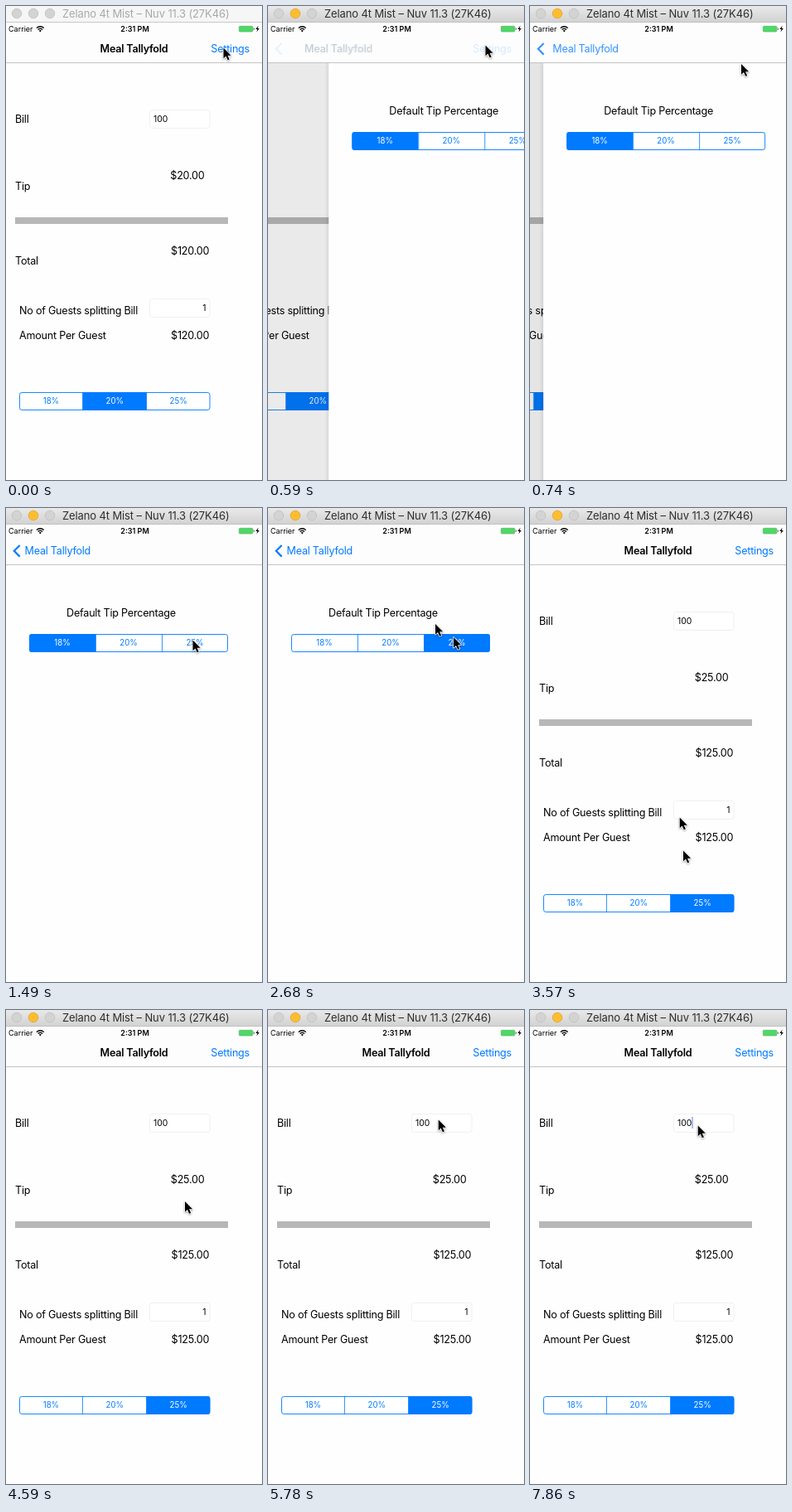
Animation, 309 px wide and 572 px high, one loop 8000 ms. Source, as an HTML page:

```html
<!DOCTYPE html>
<html lang="en">
<head>
<meta charset="utf-8">
<title>Bill splitter demo</title>
<style>
  html, body { margin: 0; width: 100%; height: 100%; overflow: hidden; background: #fefefe; }
  svg { display: block; width: 309px; height: 572px; }
  text { font: 400 12.6px Inter, "Liberation Sans", sans-serif; letter-spacing: -.23px; fill: #000; white-space: pre; }
  .blue { fill: #007aff; }
  .bold { font-weight: 600; }
  .end { text-anchor: end; }
  .mid { text-anchor: middle; }
  .status { font-size: 9px; letter-spacing: 0; }
  .field { font-size: 10.4px; letter-spacing: 0; }
  .seg { font-size: 9.7px; letter-spacing: 0; text-anchor: middle; }
  .window { font-size: 13px; letter-spacing: -.12px; }
  .cursor { filter: drop-shadow(0 1px 1px rgba(0, 0, 0, .35)); }
</style>
</head>
<body>
<svg id="stage" viewBox="0 0 309 572"></svg>
<script>
const LOOP = 8000, STEP = 148.2, BLUE = '#007aff';
const APP = 'Meal Tallyfold';
const WINDOW = 'Zelano 4t Mist – Nuv 11.3 (27K46)';
const RATES = [18, 20, 25];
const BILL = 100;

// Pointer tip as [tick, x, y]; each place holds until the next.
const POINTER = [
  [0, 262.5, 50.5], [3, 262.5, 49], [4, 262.5, 47.5], [5, 255, 70], [6, 240, 115], [7, 228, 143],
  [8, 224.5, 153], [9, 225, 156], [10, 225.5, 159.5], [17, 224, 156], [18, 202, 140],
  [19, 80, 75], [20, 20, 51], [22, 80, 190], [23, 181, 373], [24, 185, 413.5],
  [25, 198, 448], [26, 208, 468], [27, 214, 477], [28, 215, 478],
  [30, 133, 345], [31, 216, 231], [33, 216, 212], [34, 216, 185], [35, 216, 167],
  [38, 210, 146], [39, 205.7, 132.5], [42, 203, 137], [43, 202.7, 139.5]
];
// The pointer leaves a brief trail on these ticks.
const TRAIL = { 18: [224, 156], 24: [180.7, 373.5] };
const CARET = [[0, 0], [48, .8], [50, .35], [51, 0], [53, .6]];

const label = (x, y, s, cls = '', id = '') =>
  `<text x="${x}" y="${y}" class="${cls}"${id && ` id="${id}"`}>${s}</text>`;

const field = y =>
  `<rect x="173.5" y="${y}" width="72.5" height="22" rx="3" fill="#fff" stroke="#f0f0f0"/>`;

function segments(id, x, y, w) {
  const part = w / 3;
  const cells = RATES.map((r, i) =>
    `<rect id="${id}Fill${i}" x="${x + i * part}" y="${y}" width="${part}" height="22"/>` +
    label(x + (i + .5) * part, y + 14.2, r + '%', 'seg', `${id}Text${i}`)).join('');
  const lines = [1, 2].map(i => `M${Math.floor(x + i * part) + .5} ${y}v22`).join('');
  return `<clipPath id="${id}Clip"><rect x="${x}" y="${y}" width="${w}" height="22" rx="3"/></clipPath>
    <g clip-path="url(#${id}Clip)">${cells}</g>
    <rect x="${x + .5}" y="${y + .5}" width="${w - 1}" height="21" rx="2.7" fill="none" stroke="${BLUE}" stroke-width=".9"/>
    <path d="${lines}" stroke="${BLUE}" stroke-width=".8"/>`;
}

const arrow = id => `<g id="${id}"><path class="cursor" d="M0 0V12.8L3 10L5.1 14.8L7.2 13.9L5.1 9.3H9.2Z"
  fill="#000" stroke="#fff" stroke-width="1.5" stroke-linejoin="round" paint-order="stroke"/></g>`;

const stage = document.getElementById('stage');
stage.innerHTML = `
<defs>
  <linearGradient id="chrome" x2="0" y2="1"><stop stop-color="#e9e9e9"/><stop offset="1" stop-color="#d1d1d1"/></linearGradient>
  <linearGradient id="edge"><stop stop-color="#000" stop-opacity="0"/><stop offset="1" stop-color="#000" stop-opacity=".08"/></linearGradient>
  <clipPath id="body"><rect y="69" width="309" height="503"/></clipPath>
</defs>
<rect width="309" height="572" fill="#fefefe"/>
<g clip-path="url(#body)">
  <g id="main">
    ${label(11, 141, 'Bill')}${field(125.5)}${label(178, 140, BILL, 'field')}
    <rect id="caret" x="195.3" y="129" width="1.5" height="14" fill="#426bf2"/>
    ${label(11, 222, 'Tip')}${label(239.5, 209, '', 'end', 'tip')}
    <rect x="11" y="255" width="257" height="8" fill="#b7b7b7"/>
    ${label(11, 312, 'Total')}${label(245.2, 299.5, '', 'end', 'total')}
    ${label(16, 371.5, 'No of Guests splitting Bill')}${field(353.5)}${label(241.5, 368, 1, 'field end')}
    ${label(16, 402.3, 'Amount Per Guest')}${label(245.2, 402.3, '', 'end', 'share')}
    ${segments('rate', 16, 466, 230.5)}
  </g>
  <rect id="dim" y="69" width="309" height="503"/>
  <g id="prefs">
    <rect x="-5" y="69" width="5" height="503" fill="url(#edge)"/>
    <rect y="69" width="309" height="503" fill="#fefefe"/>
    ${label(139, 131, 'Default Tip Percentage', 'mid')}
    ${segments('pref', 28, 152, 240)}
  </g>
</g>
<rect y="20" width="309" height="48.5" fill="#fdfdfd"/>
<path d="M0 68.5H309" stroke="#c4c4c4"/>
${label(3, 31, 'Carrier', 'status')}
<g fill="none" stroke="#000" stroke-width="1.3">
  <path d="M36.8 26.6a6.4 6.4 0 0 1 9 0M38.6 28.5a3.8 3.8 0 0 1 5.4 0"/>
  <path d="M41.3 31.4l-1.5-1.6a2.1 2.1 0 0 1 3 0z" fill="#000" stroke="none"/>
</g>
${label(155.5, 31, '2:31 PM', 'status bold mid')}
<rect x="281.3" y="24.3" width="16.6" height="6.8" rx="1.3" fill="#4cd964" stroke="#5fa66c" stroke-width=".6"/>
<path d="M298.8 26.3q1 .3 1 1.4t-1 1.4z" fill="#444"/>
<path d="M304.6 23.8l-3.3 4.3h2.1l-1 3.4l3.4-4.4h-2.1z"/>
<path id="chevron" d="M16.6 45l-6.8 6.8l6.8 6.8" fill="none" stroke="${BLUE}" stroke-width="2.2"/>
${label(0, 56, APP, 'bold', 'title')}
${label(0, 56, APP, 'blue', 'back')}
${label(294, 56, 'Settings', 'blue end', 'settings')}
<rect id="bar" width="309" height="20"/>
<path d="M0 19.6H309" stroke="#bcbcbc" stroke-width=".8"/>
${[0, 1, 2].map(i => `<circle id="dot${i}" cx="${13 + 20 * i}" cy="9" r="5.8" stroke-width=".8"/>`).join('')}
${label(68, 14, WINDOW, 'window', 'name')}
${arrow('ghost')}${arrow('pointer')}`;

const el = {};
stage.querySelectorAll('[id]').forEach(n => el[n.id] = n);

const set = (id, attrs) => {
  for (const key in attrs) el[id].setAttribute(key, attrs[key]);
};
const clamp = v => Math.min(1, Math.max(0, v));
const at = (list, tick) => list.filter(row => row[0] <= tick).pop();
const move = (x, y) => ({ transform: `translate(${x} ${y})` });

// Critically damped spring, started at a given tick.
function spring(tick, start) {
  const x = 13 * Math.max(0, tick - start) * STEP / 1000;
  const p = 1 - (1 + x) * Math.exp(-x);
  return p > .994 ? 1 : p;
}

function select(id, chosen) {
  RATES.forEach((_, i) => {
    const on = i === chosen;
    set(`${id}Fill${i}`, { fill: on ? BLUE : '#fff', 'fill-opacity': on ? 1 : .3 });
    el[`${id}Text${i}`].style.fill = on ? '#fff' : BLUE;
  });
}

function chrome(active) {
  set('bar', { fill: active ? 'url(#chrome)' : '#f6f6f6' });
  el.name.style.fill = active ? '#2e2e2e' : '#a9a9a9';
  for (let i = 0; i < 3; i++) {
    const lit = active && i === 1;
    set('dot' + i, { fill: lit ? '#fdbd2e' : '#d3d3d3', stroke: lit ? '#e0a431' : '#bfbfbf' });
  }
}

const titleX = 154.5 - el.title.getComputedTextLength() / 2;

function draw(time) {
  const tick = Math.floor((time % LOOP + 8) / STEP);
  const p = tick < 20 ? spring(tick, 2.565) : tick > 23 ? 0 : 1 - spring(tick, 20.2);

  chrome(tick > 0);

  const chosen = tick < 16 ? 1 : 2;
  const tip = BILL * RATES[chosen] / 100;
  const money = v => '$' + v.toFixed(2);
  el.tip.textContent = money(tip);
  el.total.textContent = el.share.textContent = money(BILL + tip);
  select('rate', chosen);
  select('pref', tick < 16 ? 0 : 2);

  set('main', move(-93 * p, 0));
  set('dim', { opacity: .105 * p });
  set('prefs', { ...move(309 * (1 - p), 0), visibility: p ? 'visible' : 'hidden' });

  const x = titleX + (22.5 - titleX) * p;
  const fade = clamp(1 - 1.12 * p), appear = clamp((p - .74) / .26);
  set('title', { x, opacity: fade });
  set('back', { x, opacity: appear });
  set('chevron', { opacity: appear });
  set('settings', { opacity: fade });

  set('caret', { opacity: at(CARET, tick)[1] });
  const [, px, py] = at(POINTER, tick);
  set('pointer', move(px, py));
  const trail = TRAIL[tick];
  set('ghost', { visibility: trail ? 'visible' : 'hidden', ...(trail ? move(...trail) : {}) });
}

const began = performance.now();
(function loop() {
  draw(performance.now() - began);
  requestAnimationFrame(loop);
})();
</script>
</body>
</html>
```
